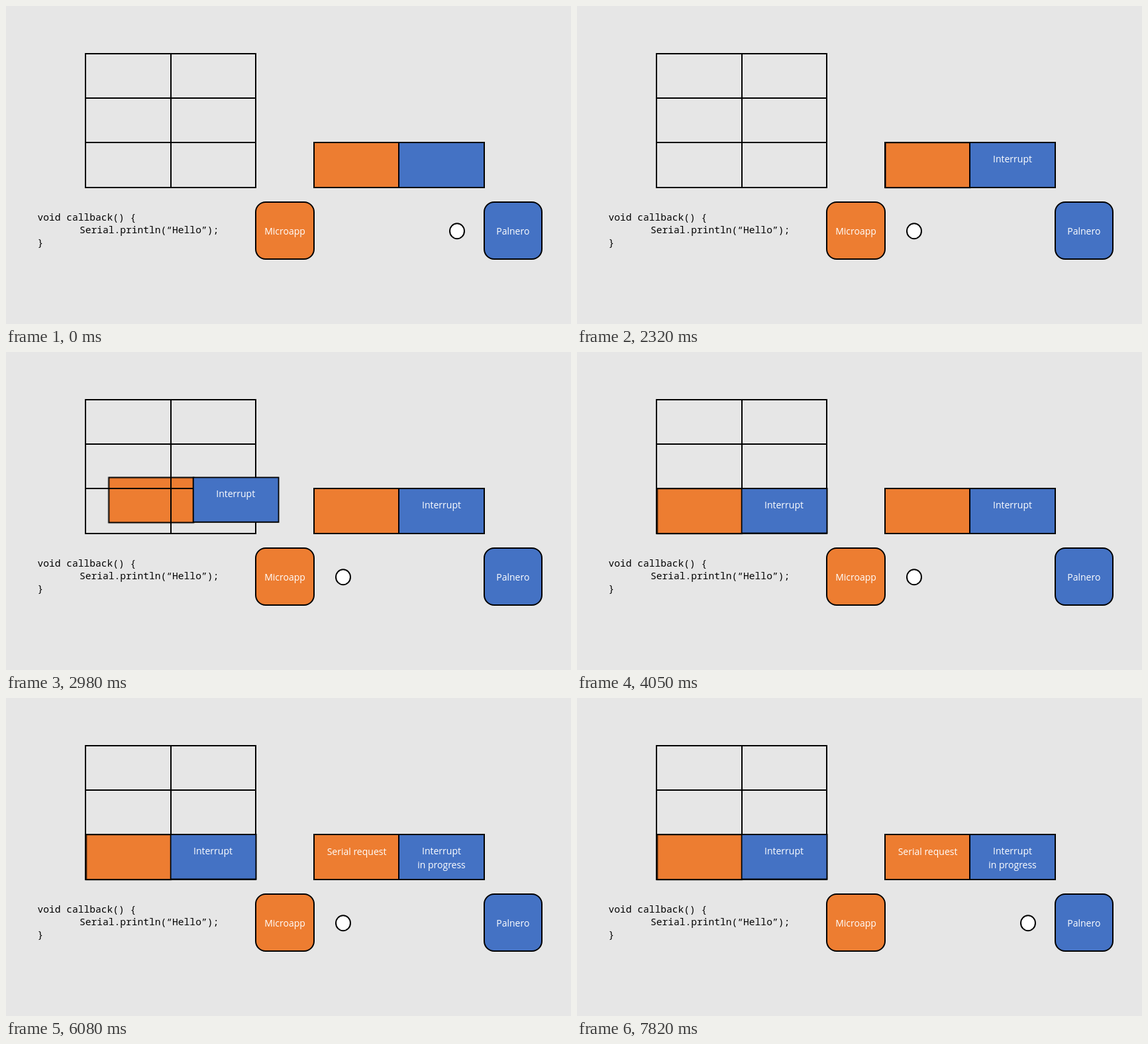
An HTML page for the animation above (8000 ms loop, 853 px wide and 480 px high).

```html
<!DOCTYPE html>
<html lang="en">
<head>
<meta charset="utf-8">
<title>Interrupt flow</title>
<style>
  html, body { margin: 0; width: 100%; height: 100%; overflow: hidden; background: #e6e6e6; }
  svg { display: block; width: 100vw; height: 100vh; }

  .line { fill: none; stroke: #000; stroke-width: 2; }
  .app, .net { stroke: #000; stroke-width: 2; }
  .app { fill: #ed7d31; }
  .net { fill: #4472c4; }
  .label { font: 14px "Open Sans", "Noto Sans", sans-serif; fill: #fff; text-anchor: middle; }
  .code { font: 14.6px "Noto Sans Mono", "DejaVu Sans Mono", monospace; fill: #000; }

  .ball, .interrupt, .request, .copy-x, .copy-y, .progress {
    animation: 8s linear infinite;
  }
  .ball { animation-name: ball; }
  .interrupt { animation-name: interrupt; }
  .request { animation-name: request; }
  .copy-x { animation-name: copy-x; }
  .copy-y { animation-name: copy-y; }
  .progress { animation-name: progress; }

  /* message token travelling between the two programs */
  @keyframes ball {
    0%, 100% { transform: translateX(0); }
    11.8% { transform: translateX(0); animation-timing-function: cubic-bezier(.364, 0, .636, 1); }
    21.95%, 76.1% { transform: translateX(-172px); }
    76.1% { animation-timing-function: cubic-bezier(.364, 0, .636, 1); }
    86.2% { transform: translateX(0); }
  }

  /* blocks zooming out of their program into the shared buffer */
  @keyframes interrupt {
    0% { transform: translate(771px, 354px) scale(0); opacity: 0; }
    10%, 100% { transform: translate(657.5px, 240px) scale(1); opacity: 1; }
  }
  @keyframes request {
    0%, 64.75% { transform: translate(414.6px, 358px) scale(0); opacity: 0; }
    74.75%, 100% { transform: translate(529px, 240px) scale(1); opacity: 1; }
  }

  /* buffer copy arcing over to the table */
  @keyframes copy-x {
    0%, 28.99% { transform: translateX(0); opacity: 0; }
    29% { transform: translateX(0); opacity: 1; }
    29.3% { transform: translateX(0); opacity: 1; animation-timing-function: cubic-bezier(.364, 0, .636, 1); }
    39.3%, 100% { transform: translateX(-344.5px); opacity: 1; }
  }
  @keyframes copy-y {
    0% { transform: translateY(0); }
    29.3% { transform: translateY(0); animation-timing-function: cubic-bezier(.45, 0, .7, 1); }
    34.3% { transform: translateY(-60px); animation-timing-function: cubic-bezier(.3, 0, .55, 1); }
    39.3%, 100% { transform: translateY(0); }
  }

  @keyframes progress {
    0%, 53% { opacity: 0; }
    58.25%, 100% { opacity: 1; }
  }
</style>
</head>
<body>
<svg viewBox="0 0 853 480" preserveAspectRatio="none">
  <!-- shared buffer -->
  <rect class="app" x="465" y="206" width="128" height="68"/>
  <rect class="net" x="593" y="206" width="129" height="68"/>

  <!-- copied left half sits under the table lines -->
  <g class="copy-x"><g class="copy-y">
    <rect class="app" x="465.5" y="206.2" width="128" height="68"/>
  </g></g>

  <path class="line" d="M120 72H377V274H120ZM120 139H377M120 206H377M249 72V274"/>

  <g class="copy-x"><g class="copy-y">
    <rect class="net" x="593" y="206" width="129" height="67.5"/>
    <text class="label" x="657" y="235.5">Interrupt</text>
  </g></g>

  <!-- programs -->
  <rect class="app" x="377" y="296" width="88" height="86" rx="15"/>
  <text class="label" x="421" y="345">Microapp</text>
  <rect class="net" x="722" y="296" width="87" height="86" rx="15"/>
  <text class="label" x="765.3" y="345">Palnero</text>

  <g class="interrupt">
    <rect class="net" x="-64.5" y="-34" width="129" height="68"/>
    <text class="label" x="0" y="-4">Interrupt</text>
  </g>
  <text class="label progress" x="657.5" y="257">in progress</text>

  <g class="request">
    <rect class="app" x="-64" y="-34" width="128" height="68"/>
    <text class="label" x=".5" y="-3">Serial request</text>
  </g>

  <ellipse class="ball" cx="681" cy="339.7" rx="11" ry="11.5" fill="#fff" stroke="#000" stroke-width="2"/>

  <text class="code" x="47.5" y="324">void callback() {</text>
  <text class="code" x="111" y="343">Serial.println(“Hello”);</text>
  <text class="code" x="47.5" y="362">}</text>
</svg>
</body>
</html>
```
